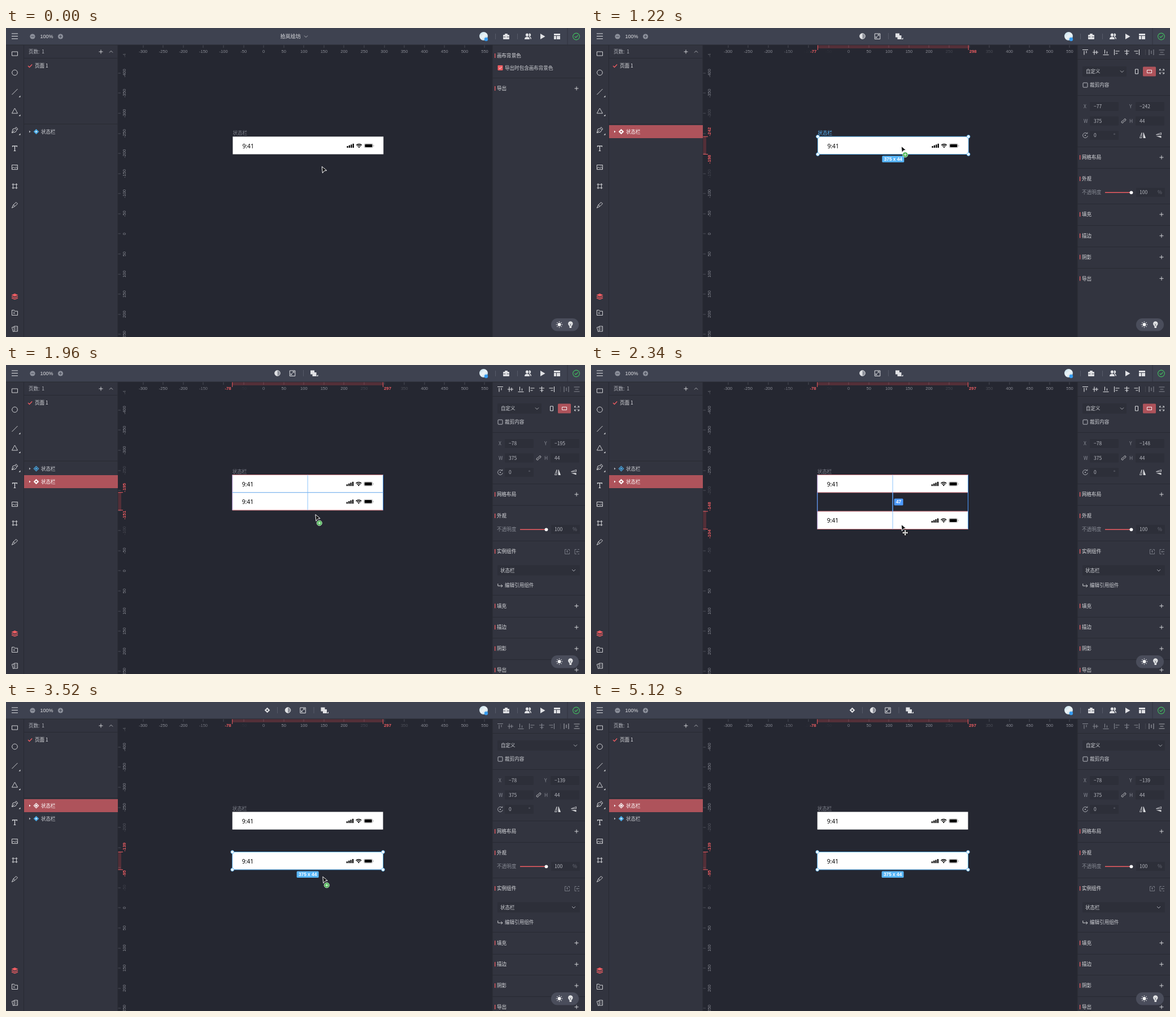
These frames come from a looping animation (1025x547 px, 5.22 s). An HTML page with a canvas:

```html
<!DOCTYPE html>
<html lang="zh">
<head>
<meta charset="utf-8">
<style>
html, body { margin: 0; width: 100%; height: 100%; overflow: hidden; background: #252731; }
canvas { display: block; width: 1025px; height: 547px; }
</style>
</head>
<body>
<canvas id="stage" width="1025" height="547"></canvas>
<script>
const g = document.getElementById('stage').getContext('2d');
const LOOP = 5220, UNIT = 0.7114;
const px = u => 456.2 + u * UNIT, py = u => 364.4 + u * UNIT;
const CJK = '"Noto Sans CJK SC", "Noto Sans CJK", sans-serif';
const ARIAL = '"Liberation Sans", Arial, sans-serif';
const C = {
  top: '#3e4250', panel: '#32343f', canvas: '#252731', edge: '#282a33', field: '#2d2f39',
  text: '#e0e1e4', soft: '#b7b9c0', grey: '#878a94', dim: '#6b6e78',
  red: '#ee5d62', row: '#ae535b', blue: '#4aa9e4', sel: '#58b6f8', guide: '#4c9aff', green: '#42bd5f'
};

// time, cursor x, y, badge, mode, top of the dragged copy
const steps = [
  [0, 559, 245, '', 'idle'], [150, 552, 231, '', 'idle'], [390, -1, 0, '', 'hover'],
  [540, 549, 216, '', 'hover'], [690, 549, 215, 'plus', 'hover'], [840, 549, 211, 'plus', 'picked'],
  [980, -1, 0, '', 'picked'], [1220, 549, 209, 'plus', 'picked'], [1370, 549, 209, '', 'picked'],
  [1510, 549, 214, 'plus', 'picked'], [1660, 548, 237, 'plus', 'picked'], [1810, 548, 254, 'plus', 'picked'],
  [1960, 547.5, 264.5, 'plus', 'drag', -195], [2100, 549, 274, 'move', 'drag', -168],
  [2340, 549, 282, 'move', 'drag', -148], [2480, 549, 282, 'move', 'drag', -142],
  [2630, 549, 282, 'move', 'drag', -139], [3380, 549, 282, '', 'drag', -139],
  [3520, 560.5, 309, 'plus', 'drop', -139], [3670, 662, 387, '', 'drop', -139],
  [3850, 816, 471, '', 'drop', -139], [4000, 871, 495, '', 'drop', -139],
  [4150, 919, 509, '', 'drop', -139], [4300, -1, 0, '', 'drop', -139]
];

function rect(x, y, w, h, fill, r = 0) {
  g.fillStyle = fill;
  g.beginPath(); g.roundRect(x, y, w, h, r); g.fill();
}
function box(x, y, w, h, color, lw = 1, r = 0) {
  g.strokeStyle = color; g.lineWidth = lw;
  g.beginPath(); g.roundRect(x, y, w, h, r); g.stroke();
}
function disc(x, y, r, fill, line, lw = 1) {
  g.beginPath(); g.arc(x, y, r, 0, Math.PI * 2);
  if (fill) { g.fillStyle = fill; g.fill(); }
  if (line) { g.strokeStyle = line; g.lineWidth = lw; g.stroke(); }
}
// SVG path data moved to x, y
function path(x, y, d, line, fill, lw = 0.9) {
  g.save(); g.translate(x, y);
  const p = new Path2D(d);
  if (fill) { g.fillStyle = fill; g.fill(p); }
  if (line) { g.strokeStyle = line; g.lineWidth = lw; g.stroke(p); }
  g.restore();
}
function text(s, x, cy, color = C.text, size = 8.55, align = 'left', font = CJK, weight = 400) {
  g.font = `${weight} ${size}px ${font}`;
  g.textAlign = align; g.fillStyle = color;
  g.fillText(s, x, cy + size * 0.37);
}
function upText(s, x, y, color, size, align, weight) {
  g.save(); g.translate(x, y); g.rotate(-Math.PI / 2);
  text(s, 0, 0, color, size, align, ARIAL, weight);
  g.restore();
}
const hline = (x, y, w, color = C.edge) => rect(x, y, w, 1, color);
const vline = (x, y, h, color = C.edge) => rect(x, y, 1, h, color);
const plus = (x, y, color = C.text, r = 3.5) => path(x, y, `M${-r} 0H${r}M0 ${-r}V${r}`, color);
const chevron = (x, y, s = 1) => path(x, y, `M-3 ${-1.5 * s}L0 ${1.5 * s}L3 ${-1.5 * s}`, C.soft);
const minus = n => String(n).replace('-', '−');

function diamond(x, y, color, hole, hollow) {
  if (hollow) {
    path(x, y, 'M0-4.2L4.2 0L0 4.2L-4.2 0Z', color, null, 1.1);
    path(x, y, 'M0-2.3L2.3 0L0 2.3L-2.3 0Z', null, color);
  } else {
    path(x, y, 'M0-4.8L4.8 0L0 4.8L-4.8 0Z', null, color);
    path(x, y, 'M0-1.8L1.8 0L0 1.8L-1.8 0Z', null, hole);
  }
}

function topBar(mode) {
  rect(0, 0, 1025, 30, C.top);
  hline(0, 29.5, 1025);
  path(15.5, 14.5, 'M-5.5-4.5H5.5M-5.5 0H5.5M-5.5 4.5H5.5', C.text, null, 1.1);
  for (const x of [47, 96.5]) {
    disc(x, 15, 4.6, '#8d919c');
    path(x, 15, x < 50 ? 'M-2.5 0H2.5' : 'M-2.5 0H2.5M0-2.5V2.5', C.top);
  }
  text('100%', 60.5, 15, C.text, 9, 'left', ARIAL);

  if (mode === 'idle' || mode === 'hover') {
    text('拾岚绘坊', 485.5, 14.5, C.text, 9.1);
    chevron(531, 15);
  } else {
    const x = mode === 'drop' ? 499 : 480.5;
    if (mode === 'drop') { diamond(462.5, 14.5, C.text, C.top); vline(480, 9, 11, '#565a68'); }
    disc(x, 14.5, 4.8, '#8d909a', C.text);
    path(x, 14.5, 'M0-4.8A4.8 4.8 0 0 0 0 4.8Z', null, C.text);
    box(x + 21.8, 10, 9.5, 9.5, C.text);
    path(x + 26.5, 14.5, 'M.5-2.8H2.8V-.5M2.8-2.8L-2.8 2.8M-2.8.5V2.8H-.5', C.text);
    vline(x + 45.5, 9, 11, '#565a68');
    rect(x + 58.5, 9.5, 7, 7, C.text);
    rect(x + 62, 13, 7, 7, C.text);
    path(x + 70, 19, 'M2-2V1H-1Z', null, C.text);
  }

  const sky = g.createLinearGradient(840, 8, 851, 22);
  sky.addColorStop(0, '#c9e3ee'); sky.addColorStop(0.5, '#eef4f6'); sky.addColorStop(1, '#a8cfe2');
  disc(845.5, 14.5, 7.5, sky);
  disc(850, 20, 3.2, '#379cf0');
  for (const x of [866, 905]) vline(x, 10, 10, '#565a68');
  path(885.5, 15, 'M-5-2.5H5V4.5H-5ZM-2-2.5V-4.5H2V-2.5', C.text, C.text);
  path(885.5, 15, 'M-5 .8H-1.2M1.2.8H5', C.top);
  disc(922.5, 12.2, 2.6, C.text);
  path(922.5, 15, 'M-4.5 5C-4.5 1.5-2 .5 0 .5S4.5 1.5 4.5 5Z', null, C.text);
  path(927, 13, 'M-1-3.5A2.5 2.5 0 0 1-.2 2C2 2.5 3 4.5 3 6.5H1.5C1 4 0 3-1 2.2Z', null, C.text);
  path(946, 15, 'M0-5L8.5 0L0 5Z', null, C.text);
  rect(970, 10, 11, 3, C.text); rect(970, 14, 4, 6, C.text); rect(975, 14, 6, 6, C.text);
  vline(993.5, 0, 30, '#30333e');
  disc(1009.5, 15, 5.9, null, C.green, 1.1);
  path(1009.5, 15, 'M-2.8 0L-.8 2L3-2', C.green, null, 1.1);
}

function toolStrip() {
  rect(0, 30, 31, 517, C.panel);
  const draw = (y, d) => path(15.5, y, d, C.text);
  draw(45.5, 'M-5-3.5H5V3.5H-5Z');
  disc(15.5, 79, 4.8, null, C.text, 0.9);
  draw(113, 'M-5 5L5-5');
  draw(147, 'M0-5L5 4H-5Z');
  draw(180.5, 'M-5 5L-3.5-1.5L1-3L3.5 0L1.5 3.5ZM1-3L2.5-5L5.5-1.5L3.5 0M-5 5L-.5.3');
  path(15.5, 213, 'M-4-2.5V-4.2H4V-2.5M0-4.2V4.5M-1.8 4.5H1.8', C.text, null, 1.2);
  draw(246.5, 'M-5-4H5V4H-5ZM-5 2.5L-2-.5L.5 2L2.5 0L5 2.5M2-2H3');
  draw(280, 'M-3-5V5M3-5V5M-5-3H5M-5 3H5');
  draw(313.5, 'M-5 5L-2.5-.5L2.5-5L5-2.5L.5 2ZM-2.5-.5L.5 2');
  for (const y of [121, 154.5, 188]) path(24, y, 'M1.5-1.5V1.5H-1.5Z', null, C.text);
  path(15.5, 475, 'M0-5L6-2.2L0 .6L-6-2.2Z', null, C.red);
  path(15.5, 475, 'M-5.5.2L0 2.8L5.5.2M-5.5 2.8L0 5.4L5.5 2.8', C.red, null, 1.3);
  draw(504, 'M-5 4.5V-4.5H-1L.5-2.7H5V4.5ZM-2.5 1.5H0M-2.5-.8H0');
  draw(532.5, 'M-1-4.5H5V4.5H-1ZM-1-3.5L-5-2.5L-3 5L-1 4.5M1-1.5H3M1 1.5H3');
}

function layerRow(y, selected, hollow, hover) {
  if (selected || hover) rect(32, y - 11.5, 166, 23, selected ? C.row : '#3d404c');
  path(41, y, 'M0-2L2.6 0L0 2Z', null, selected ? '#fff' : C.soft);
  diamond(53.5, y, selected ? '#fff' : C.blue, selected ? C.row : '#d8ecf7', hollow);
  text('状态栏', 62, y, selected ? '#fff' : '#d0d2d7');
}

function layersPanel(mode) {
  rect(32, 30, 166, 517, C.panel);
  vline(31, 30, 517);
  vline(197.5, 30, 517);
  text('页数:  1', 40, 42, C.soft);
  plus(168, 42);
  chevron(186, 42, -1);
  hline(32, 53, 166);
  path(42.5, 67, 'M-3.5 0L-1 2.5L3.7-2.5', C.red, null, 1.3);
  text('页面 1', 51, 67);
  hline(32, 169.5, 166);
  if (mode === 'drag') { layerRow(183.5, false, true); layerRow(206.5, true); }
  else if (mode === 'drop') { layerRow(183.5, true, true); layerRow(206.5, false); }
  else layerRow(183.5, mode === 'picked', false, mode === 'hover');
}

function rulers(span) {
  const fade = (u, a, b) => span ? Math.min(1, (Math.min(Math.abs(u - a), Math.abs(u - b)) / 85) ** 2) : 1;
  const tint = 'rgba(220,70,78,0.26)';
  const [l, r, t, b] = span || [];
  for (let u = -300; u <= 550; u += 50) {
    vline(Math.round(px(u)) - 0.5, 30, 5, '#4b4d57');
    g.globalAlpha = fade(u, l, r);
    text(u, px(u), 41, '#8b8d96', 7.5, 'center', ARIAL);
    g.globalAlpha = 1;
  }
  g.save();
  g.beginPath(); g.rect(198, 45, 20, 502); g.clip();
  for (let u = -450; u <= 250; u += 50) {
    hline(198, Math.round(py(u)) - 0.5, 5, '#4b4d57');
    g.globalAlpha = fade(u, t, b) * (u === -450 ? 0.6 : 1);
    upText(u, 209, py(u), '#8b8d96', 7.5, 'center');
    g.globalAlpha = 1;
  }
  g.restore();
  if (!span) return;
  rect(px(l), 30, (r - l) * UNIT, 6, tint);
  rect(198, py(t), 6, (b - t) * UNIT, tint);
  for (const u of [l, r]) vline(px(u) - 0.5, 30, 9, C.red);
  for (const u of [t, b]) hline(198, py(u) - 0.5, 9, C.red);
  text(l, px(l) - 2, 41, C.red, 7.8, 'right', ARIAL, 700);
  text(r, px(r) + 1.5, 41, C.red, 7.8, 'left', ARIAL, 700);
  upText(t, 209, py(t) - 1, C.red, 7.8, 'left', 700);
  upText(b, 209, py(b) + 1, C.red, 7.8, 'right', 700);
}

function statusBar(u, v) {
  const x = px(u), y = py(v);
  rect(x, y, 375 * UNIT, 44 * UNIT, '#fff');
  text('9:41', x + 17, y + 16.5, '#000', 10.3, 'left', '"Noto Sans", sans-serif');
  for (let i = 0; i < 4; i++) {
    const h = 3 + i * 1.45;
    rect(x + 202 + i * 3.4, y + 19.8 - h, 2.3, h, '#000', 0.5);
  }
  g.save();
  g.translate(x + 223.6, y + 20);
  for (const [r, w] of [[1.2, 2.4], [4.2, 1.5], [6.8, 1.5]]) {
    g.strokeStyle = '#000'; g.lineWidth = w;
    g.beginPath(); g.arc(0, 0, r, Math.PI * 1.25, Math.PI * 1.75); g.stroke();
  }
  g.restore();
  box(x + 232.8, y + 12.4, 15.4, 7.4, '#aaa', 0.7, 2);
  rect(x + 234, y + 13.4, 13, 5.4, '#000', 1);
  rect(x + 249, y + 14.8, 1, 2.6, '#aaa', 0.5);
}

function selection(u, v, handles) {
  const x = px(u), y = py(v), w = 375 * UNIT, h = 44 * UNIT;
  box(x, y, w, h, C.sel, 0.9);
  if (!handles) return;
  for (const hx of [x, x + w]) for (const hy of [y, y + h]) disc(hx, hy, 2.8, '#fff', C.sel, 0.9);
  rect(x + w / 2 - 19.5, y + h + 2.6, 39, 11.7, C.sel, 1.5);
  text('375 x 44', x + w / 2, y + h + 8.5, '#fff', 8.3, 'center', ARIAL, 700);
}

function guides(v) {
  const x = px(-78), w = 375 * UNIT, top = py(-239), end = py(-195), low = py(v), bottom = py(v + 44);
  const gap = v + 195;
  for (const y of gap ? [top, end, low, bottom] : [top, bottom]) hline(x, y - 0.5, w, '#dc7f86');
  vline(x - 0.5, top, bottom - top, '#b094cf');
  vline(x + w / 2 - 0.5, top, bottom - top, '#8cc4fb');
  vline(x + w - 0.5, top, bottom - top, C.guide);
  if (!gap) {
    hline(x, end - 0.5, w, '#6aaef5');
    return;
  }
  for (const gx of [x, x + w / 2, x + w]) vline(gx - 0.5, end, low - end, C.guide);
  const mid = (end + low) / 2;
  rect(x + w / 2 + 2.5, mid - 6, 16, 12, C.guide, 1.5);
  text(gap, x + w / 2 + 10.5, mid, '#fff', 8.3, 'center', ARIAL, 700);
}

function artboard(mode, v) {
  const copied = v !== undefined, u = copied ? -78 : -77, main = copied ? -239 : -242;
  const lit = mode === 'hover' || mode === 'picked';
  text('状态栏', px(u), py(main) - 6, lit ? C.sel : '#7c7f89');
  statusBar(u, main);
  if (copied) statusBar(u, v);
  if (lit) selection(u, main, mode === 'picked');
  if (mode === 'drag') guides(v);
  if (mode === 'drop') selection(u, v, true);
}

function heading(s, y, add = true) {
  rect(865, y - 4, 1.3, 8, C.red);
  text(s, 869, y);
  if (add) plus(1010, y);
}
function field(label, x, y, value) {
  text(label, x, y, C.grey);
  rect(x + 11, y - 8, 51, 16, C.field, 1);
  text(value, x + 18, y, C.soft);
}
function alignIcons(off) {
  const ways = ['M-5-4.5H5M-2-2.5V4.5M2-2.5V1.5', 'M-5 0H5M-2-4.5V4.5M2-3V3', 'M-5 4.5H5M-2 2.5V-4.5M2 2.5V-1.5',
    'M-4.5-5V5M-2.5-2H4.5M-2.5 2H1.5', 'M0-5V5M-4.5-2H4.5M-3 2H3', 'M4.5-5V5M2.5-2H-4.5M2.5 2H-1.5',
    'M-4-5V5M4-5V5M0-3V3', 'M-5-4H5M-5 4H5M-3 0H3'];
  [875, 893, 911.5, 931, 948.5, 966, 992, 1010.5].forEach((x, i) => {
    const spacing = i > 5;
    path(x, 43, ways[i], spacing !== off ? '#858891' : off ? '#a5a7ae' : C.text, null, 1.1);
  });
  vline(981, 38, 10, '#44464f');
}

function propertiesPanel(mode, v) {
  rect(861, 30, 164, 517, C.panel);
  vline(860.5, 30, 517);
  if (mode === 'idle' || mode === 'hover') {
    heading('画布背景色', 49, false);
    rect(870.5, 66, 9, 9, C.red, 1);
    path(875, 70.5, 'M-2.3 0L-.6 1.8L2.5-1.7', '#fff');
    text('导出时包含画布背景色', 883, 70.5, '#d0d2d7');
    hline(861, 88, 164);
    heading('导出', 107);
    return;
  }
  const dropped = mode === 'drop', copied = v !== undefined;
  alignIcons(dropped);
  hline(861, 55, 164);
  rect(870, 68, dropped ? 146 : 78, 18, C.field, 1);
  text('自定义', 876, 77, '#d0d2d7');
  chevron(dropped ? 1008 : 940, 77);
  if (!dropped) {
    box(963.5, 73, 5, 8, C.text);
    rect(977, 68.5, 23, 17, C.row, 1.5);
    box(984.5, 74.5, 8, 5, '#fff', 0.9);
    path(1010.5, 77, 'M-4-1.5V-4H-1.5M1.5-4H4V-1.5M4 1.5V4H1.5M-1.5 4H-4V1.5M-4-4L-1-1M4-4L1-1M4 4L1 1M-4 4L-1 1', C.text);
  }
  box(871, 97, 8, 8, C.soft, 1, 1);
  text('裁剪内容', 883, 101, '#d0d2d7');
  hline(861, 119, 164);
  field('X', 872, 139, copied ? '−78' : '−77');
  field('Y', 953, 139, minus(copied ? v : -242));
  field('W', 872, 164.5, '375');
  field('H', 953, 164.5, '44');
  field('', 872, 190, '0');
  text('°', 925, 190, C.grey);
  path(943, 164.5, 'M-.5-1.5L1.2-3.2A1.6 1.6 0 0 1 3.5-1L1.5 1M.5 1.5L-1.2 3.2A1.6 1.6 0 0 1-3.5 1L-1.5-1M-1 1L1-1', C.text);
  path(875, 190, 'M3.2-3A4.4 4.4 0 1 0 4.3 1M1.5-3.2H3.8V-5.2', C.soft);
  disc(875, 190, 1.1, C.soft);
  path(976.5, 190, 'M-1.5-4.5V4.5H-5ZM1.5-4.5V4.5H5Z', C.text, null, 0.8);
  path(976.5, 190, 'M1.5-4.5V4.5H5Z', null, C.text);
  path(1005, 190, 'M-4.5-1.2H4.5V-4.5Z', C.text, null, 0.8);
  path(1005, 190, 'M-4.5 1.2H4.5V4.5Z', null, C.text);
  hline(861, 210, 164);
  heading('网格布局', 229);
  hline(861, 248, 164);
  heading('外观', 267, false);
  text('不透明度', 869, 291.3, C.grey);
  rect(910, 290.5, 47, 1.5, C.red);
  disc(956.5, 291.3, 2.9, '#fff');
  rect(965, 283, 51, 16, C.field, 1);
  text('100', 971, 291.3, C.soft);
  text('%', 1003, 291.3, C.dim);
  hline(861, 311, 164);

  let y = 330;
  if (copied) {
    heading('实例组件', 330, false);
    path(993.5, 330.5, 'M-1-4H-4V4H4V1M1-4H4V-1M0 2V-2M-1.5-.5L0-2L1.5-.5', C.grey, null, 0.8);
    path(1011, 330.5, 'M-1-4H-4V4H-1M1-4H4M4 4H1M4 0H-1M.5-1.5L-1 0L.5 1.5', C.grey, null, 0.8);
    rect(870, 354.5, 146, 18, C.field, 1);
    text('状态栏', 875, 363.5, '#d0d2d7');
    chevron(1005, 363.5);
    path(875, 390, 'M-4.2-3V1H4M1.5-1.5L4 1L1.5 3.5', C.text);
    text('编辑引用组件', 883, 390, '#d0d2d7');
    hline(861, 407, 164);
    y = 426.5;
  }
  ['填充', '描边', '阴影', '导出'].forEach((name, i) => {
    heading(name, y + i * 37.8);
    if (i < 3) hline(861, Math.round(y + i * 37.8 + 19), 164);
  });
}

function themeSwitch() {
  rect(965, 514, 49, 22.5, '#4a4d5b', 11);
  disc(979.5, 525, 3, '#f3f3f4');
  for (let i = 0; i < 8; i++) {
    const a = i * Math.PI / 4;
    disc(979.5 + 5 * Math.cos(a), 525 + 5 * Math.sin(a), 0.75, '#f3f3f4');
  }
  disc(999.3, 523.5, 4.2, '#e3e4e6');
  rect(997.4, 526, 3.8, 5, '#e3e4e6', 1);
  path(999.3, 524, 'M-1.5-.5L0 1L1.5-.5M0 1V4', '#4a4d5b', null, 0.8);
}

function cursor(x, y, badge) {
  if (x < 0) return;
  path(x, y, 'M.3.2L8.6 7.2L4.3 7.9L1.4 11.8Z', '#fff', '#0b0b0d', 1);
  if (badge === 'plus') {
    disc(x + 7.3, y + 15.3, 4.6, '#4fb858', '#d8efd9', 0.8);
    plus(x + 7.3, y + 15.3, '#fff', 2.6);
  } else if (badge === 'move') {
    const d = 'M0-5L2-2.8H.7V-.7H2.8V-2L5 0L2.8 2V.7H.7V2.8H2L0 5L-2 2.8H-.7V.7H-2.8V2L-5 0L-2.8-2V-.7H-.7V-2.8H-2Z';
    path(x + 7.2, y + 15, d, '#111', '#fff', 1.6);
    path(x + 7.2, y + 15, d, null, '#fff');
  }
}

function frame(now) {
  const t = now % LOOP;
  const [, x, y, badge, mode, v] = steps.findLast(s => s[0] <= t);
  rect(0, 0, 1025, 547, C.canvas);
  const span = mode === 'picked' ? [-77, 298, -242, -198] : v !== undefined ? [-78, 297, v, v + 44] : null;
  rulers(span);
  artboard(mode, v);
  toolStrip();
  layersPanel(mode);
  propertiesPanel(mode, v);
  topBar(mode);
  themeSwitch();
  cursor(x, y, badge);
}

const start = performance.now();
function tick() {
  frame(performance.now() - start);
  requestAnimationFrame(tick);
}
tick();
</script>
</body>
</html>
```
